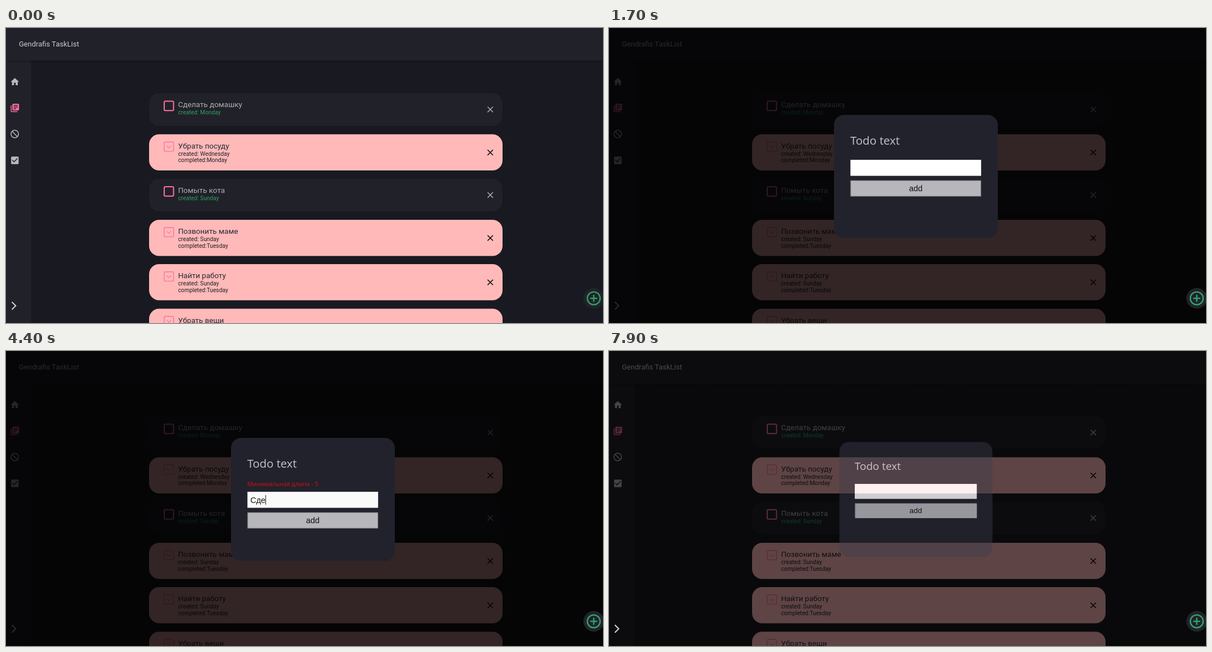
Write an HTML page with a canvas that moves like this. It is 1064 px wide and 526 px high and loops after 8000 ms.

```html
<!DOCTYPE html>
<html lang="ru">
<head>
<meta charset="utf-8">
<title>Task list</title>
<style>
html, body { margin: 0; width: 100%; height: 100%; overflow: hidden; background: #191a21; }
canvas { display: block; width: 100vw; height: 100vh; }
</style>
</head>
<body>
<canvas id="stage" width="1064" height="526"></canvas>
<script>
const W = 1064, H = 526, LOOP = 8000, STEP = 100;
const stage = document.getElementById('stage').getContext('2d');
const layer = document.createElement('canvas');
layer.width = W;
layer.height = H;
const popup = layer.getContext('2d');

const UI = 'Roboto, sans-serif';
const HEADING = '"Open Sans", "Noto Sans", sans-serif';
const FIELD = '"Liberation Sans", Arial, sans-serif';
const PANEL = '#212129', PINK = '#ff70a0', ROSE = '#ffb9b9', GREEN = '#2f9f62', GREY = '#b9b9bd';

const ICONS = [
  { y: 96, color: GREY, path: 'M10 20v-6h4v6h5v-8h3L12 3 2 12h3v8z' },
  { y: 142.5, color: PINK, path: 'M4 6H2v14c0 1.1.9 2 2 2h14v-2H4V6zm16-4H8c-1.1 0-2 .9-2 2v12c0 1.1.9 2 2 2h12c1.1 0 2-.9 2-2V4c0-1.1-.9-2-2-2zm-1 9H9V9h10v2zm-4 4H9v-2h6v2zm4-8H9V5h10v2z' },
  { y: 236, color: GREY, path: 'M19 3H5c-1.11 0-2 .9-2 2v14c0 1.1.89 2 2 2h14c1.11 0 2-.9 2-2V5c0-1.1-.89-2-2-2zm-9 14l-5-5 1.41-1.41L10 14.17l7.59-7.59L19 8l-9 9z' }
].map(icon => ({ ...icon, path: new Path2D(icon.path) }));

const TASKS = [
  { y: 116, title: 'Сделать домашку', created: 'Monday' },
  { y: 189.5, title: 'Убрать посуду', created: 'Wednesday', completed: 'Monday' },
  { y: 268.5, title: 'Помыть кота', created: 'Sunday' },
  { y: 342, title: 'Позвонить маме', created: 'Sunday', completed: 'Tuesday' },
  { y: 421, title: 'Найти работу', created: 'Sunday', completed: 'Tuesday' },
  { y: 500.5, title: 'Убрать вещи', created: 'Sunday', completed: 'Tuesday' }
];

// When each letter of the new task appears.
const PHRASE = 'Сделать домашку';
const KEYS = [3900, 4100, 4400, 4800, 5000, 5100, 5200, 5400, 5700, 6000, 6200, 6300, 6400, 6600, 6700];
const OPEN = 1167, CLOSE = 7843, FADE = 350, ZOOM = 465;

const clamp = v => Math.max(0, Math.min(1, v));

// cubic-bezier(.25, .1, .25, 1)
function ease(x) {
  x = clamp(x);
  let lo = 0, hi = 1;
  const curve = (u, a, b) => 3 * a * u * (1 - u) ** 2 + 3 * b * u * u * (1 - u) + u ** 3;
  for (let i = 0; i < 24; i++) {
    const mid = (lo + hi) / 2;
    if (curve(mid, .25, .25) < x) lo = mid; else hi = mid;
  }
  return x === 1 ? 1 : curve(lo, .1, 1);
}

const shown = (t, span) => ease((t - OPEN) / span) - ease((t - CLOSE) / span);

function text(c, str, x, y, size, family, color, align = 'left') {
  c.font = `${size}px ${family}`;
  c.fillStyle = color;
  c.textAlign = align;
  c.fillText(str, x, y);
}

function box(c, x, y, w, h, r, color) {
  c.fillStyle = color;
  c.beginPath();
  c.roundRect(x, y, w, h, r);
  c.fill();
}

function line(c, points, color, width) {
  c.strokeStyle = color;
  c.lineWidth = width;
  c.beginPath();
  points.forEach(([x, y], i) => i ? c.lineTo(x, y) : c.moveTo(x, y));
  c.stroke();
}

function ring(c, x, y, r, color, width) {
  c.strokeStyle = color;
  c.lineWidth = width;
  c.beginPath();
  c.arc(x, y, r, 0, Math.PI * 2);
  c.stroke();
}

function drawFrame() {
  const c = stage;
  c.fillStyle = '#191a21';
  c.fillRect(0, 0, W, H);
  c.fillStyle = PANEL;
  c.fillRect(0, 58, 45, H);
  const shade = c.createLinearGradient(0, 58, 0, 63);
  shade.addColorStop(0, 'rgba(0,0,0,.2)');
  shade.addColorStop(1, 'rgba(0,0,0,0)');
  c.fillStyle = shade;
  c.fillRect(0, 58, W, 5);
  c.fillStyle = PANEL;
  c.fillRect(0, 0, W, 58);
  text(c, 'Gendrafis TaskList', 23, 33, 13, UI, '#c9c9cc');

  for (const icon of ICONS) {
    c.save();
    c.translate(15.8, icon.y);
    c.scale(.74, .74);
    c.translate(-12, -12);
    c.fillStyle = icon.color;
    c.fill(icon.path);
    c.restore();
  }
  ring(c, 15.6, 189, 6.7, GREY, 1.5);
  line(c, [[10.9, 184.3], [20.3, 193.7]], GREY, 1.5);
}

function drawTask({ y, title, created, completed }) {
  const c = stage, done = Boolean(completed);
  c.save();
  c.shadowColor = 'rgba(0,0,0,.2)';
  c.shadowBlur = 3;
  box(c, 255, y, 630, done ? 64.5 : 58.5, 18, done ? ROSE : PANEL);
  c.restore();

  const mid = y + (done ? 22 : 22.8);
  c.strokeStyle = PINK;
  c.lineWidth = done ? 1.4 : 2;
  c.beginPath();
  c.roundRect(282, mid - 8.2, 16.6, 16.6, 2);
  c.stroke();
  if (done) line(c, [[286.3, mid - 1.6], [290.3, mid + 2.2], [294.3, mid - 1.6]], PINK, 1.2);

  text(c, title, 306.7, y + 25.3, 13.5, UI, done ? '#292934' : '#b0b0b3');
  text(c, 'created: ' + created, 306.7, y + 38.2, 10.25, UI, done ? '#202026' : GREEN);
  if (done) text(c, 'completed:' + completed, 306.7, y + 49.8, 10.25, UI, '#202026');

  const cy = y + (done ? 32.5 : 29.3), color = done ? '#000' : '#a9a9ae';
  line(c, [[858.3, cy - 4.8], [867.9, cy + 4.8]], color, 1.5);
  line(c, [[867.9, cy - 4.8], [858.3, cy + 4.8]], color, 1.5);
}

function drawChevron() {
  line(stage, [[10.5, 488.5], [17.3, 495.2], [10.5, 502]], '#d0d0d3', 2);
}

function typed(t) {
  if (t >= CLOSE) return '';
  if (t >= 2800 && t < 3400) return 'G';
  return PHRASE.slice(0, KEYS.filter(k => k <= t).length);
}

function drawPopup(t) {
  const c = popup, value = typed(t);
  const invalid = value.length > 0 && value.length < 5;
  const top = invalid ? 251 : 235;
  const pressed = t >= 7700;
  const size = .5 + .5 * shown(t, ZOOM);

  c.clearRect(0, 0, W, H);
  c.fillStyle = 'rgba(0,0,0,.8)';
  c.fillRect(0, 0, W, H);
  c.save();
  c.translate(547, 264.7);
  c.scale(size, size);
  c.translate(-547, -264.7);
  box(c, 401, 155, 292, 219.5, 18, '#22222c');
  text(c, 'Todo text', 430, 207.8, 20.35, HEADING, '#c4c4c8');
  if (invalid) text(c, 'Минимальная длина - 5', 430, 240.8, 10.9, HEADING, '#d40f14');

  c.fillStyle = value.length > 2 ? '#fafafa' : '#fff';
  c.fillRect(430.3, top, 232.9, 28.6);
  text(c, value, 435.5, top + 19.7, 14.4, FIELD, '#15151a');
  if (t >= 2300 && t < 7200) {
    c.fillStyle = '#111';
    c.fillRect(435.5 + c.measureText(value).width, top + 6, 1, 17);
  }

  const by = top + 36.7;
  c.fillStyle = pressed ? '#77777c' : '#929297';
  c.fillRect(430.3, by, 232.9, 28.7);
  c.fillStyle = '#b7b6bb';
  c.fillRect(431.5, by + 1.2, pressed ? 231.7 : 230.5, pressed ? 27.5 : 26.3);
  text(c, 'add', 546.8, by + 19.4, 14.4, FIELD, '#101014', 'center');
  c.restore();
}

function drawAddButton(t) {
  const c = stage;
  const hover = clamp((t - 650) / 300) - clamp((t - 1350) / 300);
  const k = 1 + .045 * hover;
  c.save();
  c.translate(1047.5, 482);
  c.scale(k, k);
  c.fillStyle = '#22222b';
  c.beginPath();
  c.arc(0, 0, 18.5, 0, Math.PI * 2);
  c.fill();
  const color = t >= 700 ? '#31a56b' : GREEN;
  ring(c, 0, 0, 11.4, color, 2.4);
  line(c, [[-6.3, 0], [6.3, 0]], color, 2.4);
  line(c, [[0, -6.3], [0, 6.3]], color, 2.4);
  c.restore();
}

function draw(t) {
  drawFrame();
  TASKS.forEach(drawTask);
  drawChevron();
  const alpha = clamp(shown(t, FADE));
  if (alpha > 0) {
    drawPopup(t);
    stage.globalAlpha = alpha;
    stage.drawImage(layer, 0, 0);
    stage.globalAlpha = 1;
    // The drawer arrow stays above the veil while it fades.
    if (alpha < 1) drawChevron();
  }
  drawAddButton(t);
}

const start = performance.now();
function tick() {
  const t = (performance.now() - start) % LOOP;
  draw(Math.floor(t / STEP) * STEP);
  requestAnimationFrame(tick);
}
tick();
</script>
</body>
</html>
```
